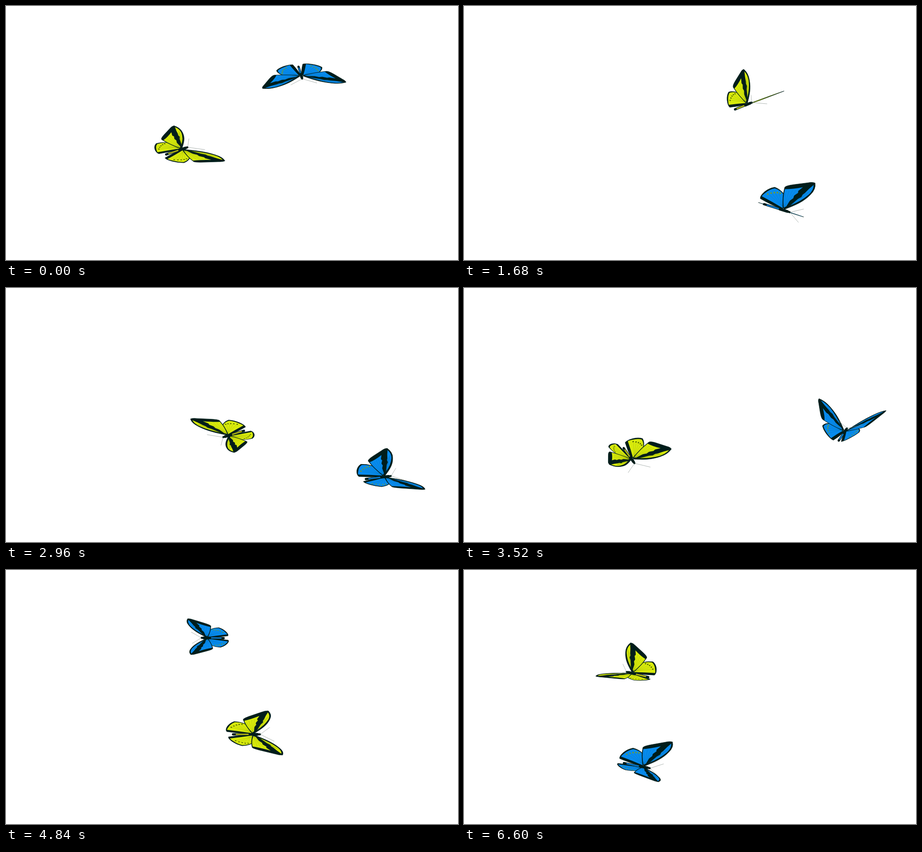
Write an HTML page with a canvas that moves like this. It is 998x561 px and loops after 6640 ms.

```html
<!DOCTYPE html>
<html lang="en">
<head>
<meta charset="utf-8">
<title>Two butterflies</title>
<style>
html, body { margin: 0; width: 100%; height: 100%; overflow: hidden; background: #fff; }
canvas { display: block; }
</style>
</head>
<body>
<canvas id="stage" width="998" height="561"></canvas>
<script>
const ctx = document.getElementById('stage').getContext('2d');
const LOOP = 6640, STEP = 40, TAU = Math.PI * 2, DEG = TAU / 360;
const BEAT = 480, RAISE = 38 * DEG;   // one wing beat and its height
const SPEED = .32;                    // px per ms at full size
const VIEW = { ground: .6, up: .8 };  // camera looking down at the flight
const SPAN = .95;
const DARK = '#001d1b';

// One wing: x runs forward along the body, y outward from the root.
const fore = new Path2D('M2 3C24 22 40 36 51 60Q60 78 53 93Q46 94 36 88L6 73Q-14 63-14 58Q-13 34-3 6Z');
const foreCells = new Path2D(
  'M-12 54Q4 59 28 73L20 60L21 55L14 45L14 38L8 29L4 12L-1 7Q-11 32-12 54Z' +
  'M51 87Q43 74 37 60L33 54L32 47L25 39L13 18Q34 36 47 59Q55 74 51 87Z');
const hind = new Path2D('M-2 2Q-3 30-11 41Q-22 50-37 51Q-49 45-57 32Q-65 18-62 11Q-34 4-2 1Z');
const hindCell = new Path2D('M-3 5Q-4 30-12 40Q-23 48-36 48Q-47 42-54 30Q-60 21-60 18Q-30 12-3 5Z');

const veins = new Path2D(), dots = new Path2D();
for (let i = 0; i < 5; i++) {
  const u = i / 4, x = -20 - 7 * i, y = 40 - 3 * u * i;
  veins.moveTo(0, 9);
  veins.lineTo(-9 + 31 * u, 50 + 14 * u);
  veins.moveTo(8 + 6 * u, 14);
  veins.lineTo(36 + 15 * u, 58 + 14 * u);
  veins.moveTo(-5, 9);
  veins.lineTo(-14 - 36 * u, 40 - 10 * u * u);
  dots.moveTo(x + 2, y);
  dots.arc(x, y, 2, 0, TAU);
}

// Key points at shared times: x, y, heading, pitch (degrees), size
const TIMES = [0, 1680, 2960, 4080, 4840, 5920, 6600];
const flies = [
  {
    fill: '#d8ea0c', vein: '#3d5a00', dot: '#4c6200', abdomen: '#b3b414',
    keys: [
      [389, 316, -41, -10, .97], [626, 217, -48, -12, .86], [491, 326, 142, 9, .9],
      [402, 413, -7, -6, 1.01], [546, 363, -11, -8, .94], [645, 252, -155, -5, .86],
      [371, 228, -148, -8, .87]
    ]
  },
  {
    fill: '#078bee', vein: '#004a70', dot: '#7f9e1c', abdomen: '#0a78cc',
    keys: [
      [652, 154, 83, 14, 1.05], [705, 451, 13, -12, .91], [836, 417, -29, -13, .99],
      [729, 190, -118, -9, 1], [444, 150, -183, 3, .75], [222, 359, -281, 7, 1],
      [396, 435, -348, -5, .9]
    ]
  }
];

const mix = (a, b, u) => a + (b - a) * u;
const add = (a, b, k) => [a[0] + b[0] * k, a[1] + b[1] * k];

// Projected body axes for a heading, pitch and size
function axes([, , heading, pitch, size]) {
  const h = heading * DEG, p = pitch * DEG;
  const project = (x, y, z) => [size * x, size * (VIEW.ground * y - VIEW.up * z)];
  const cos = Math.cos(h), sin = Math.sin(h), level = Math.cos(p), rise = Math.sin(p);
  return {
    body: project(level * cos, level * sin, rise),
    span: project(SPAN * sin, -SPAN * cos, 0),
    lift: project(-SPAN * rise * cos, -SPAN * rise * sin, SPAN * level)
  };
}

// Each key point is passed at full speed in the direction of the body.
function poseAt(keys, t) {
  let i = 0;
  while (i < keys.length - 2 && t >= TIMES[i + 1]) i++;
  const a = keys[i], b = keys[i + 1], dt = TIMES[i + 1] - TIMES[i], u = (t - TIMES[i]) / dt;
  const pose = axes(a.map((v, k) => mix(v, b[k], u)));
  const from = axes(a).body, to = axes(b).body, ease = u * u * (3 - 2 * u), v = 1 - u;
  pose.at = [0, 1].map(k =>
    mix(a[k], b[k], ease) + SPEED * dt * u * v * (v * from[k] - u * to[k]));
  const flap = RAISE * (1 - Math.cos(TAU * t / BEAT)) / 2;
  const raised = add([0, 0], pose.lift, Math.sin(flap));
  pose.wings = [-1, 1].map(side => add(raised, pose.span, side * Math.cos(flap)));
  return pose;
}

function drawWing(fly, pose, wing) {
  const matrix = [...pose.body, ...wing, ...pose.at];
  const paint = (path, color) => {
    ctx.setTransform(...matrix);
    ctx.fillStyle = color;
    ctx.fill(path);
  };
  const trace = (path, color, width) => {
    const line = new Path2D();
    line.addPath(path, new DOMMatrix(matrix));
    ctx.resetTransform();
    ctx.strokeStyle = color;
    ctx.lineWidth = width;
    ctx.stroke(line);
  };
  for (const [outline, cells] of [[hind, hindCell], [fore, foreCells]]) {
    paint(outline, DARK);
    trace(outline, DARK, .7);
    paint(cells, fly.fill);
  }
  paint(dots, fly.dot);
  ctx.globalAlpha = .35;
  trace(veins, fly.vein, .5);
  ctx.globalAlpha = 1;
}

function drawBody(fly, { at, body, span }) {
  const point = (f, s = 0) => add(add(at, body, f), span, s);
  const line = (from, to, width, color, bend = from) => {
    ctx.strokeStyle = color;
    ctx.lineWidth = width;
    ctx.beginPath();
    ctx.moveTo(...from);
    ctx.quadraticCurveTo(...bend, ...to);
    ctx.stroke();
  };
  ctx.resetTransform();
  ctx.lineCap = 'round';
  line(point(-49), point(-6), 5, DARK);
  line(point(-41), point(-12), 3, fly.abdomen);
  line(point(-8), point(10), 6, DARK);
  line(point(10), point(16), 4.5, DARK);
  for (const s of [-1, 1]) line(point(18, s), point(45, 29 * s), .7, '#8a9490', point(33, 17 * s));
  ctx.lineCap = 'butt';
}

function frame(now) {
  const t = Math.floor(now % LOOP / STEP) * STEP;
  ctx.resetTransform();
  ctx.fillStyle = '#fff';
  ctx.fillRect(0, 0, 998, 561);
  for (const fly of flies) {
    const pose = poseAt(fly.keys, t);
    for (const wing of pose.wings) drawWing(fly, pose, wing);
    drawBody(fly, pose);
  }
  requestAnimationFrame(frame);
}
frame(0);
</script>
</body>
</html>
```
